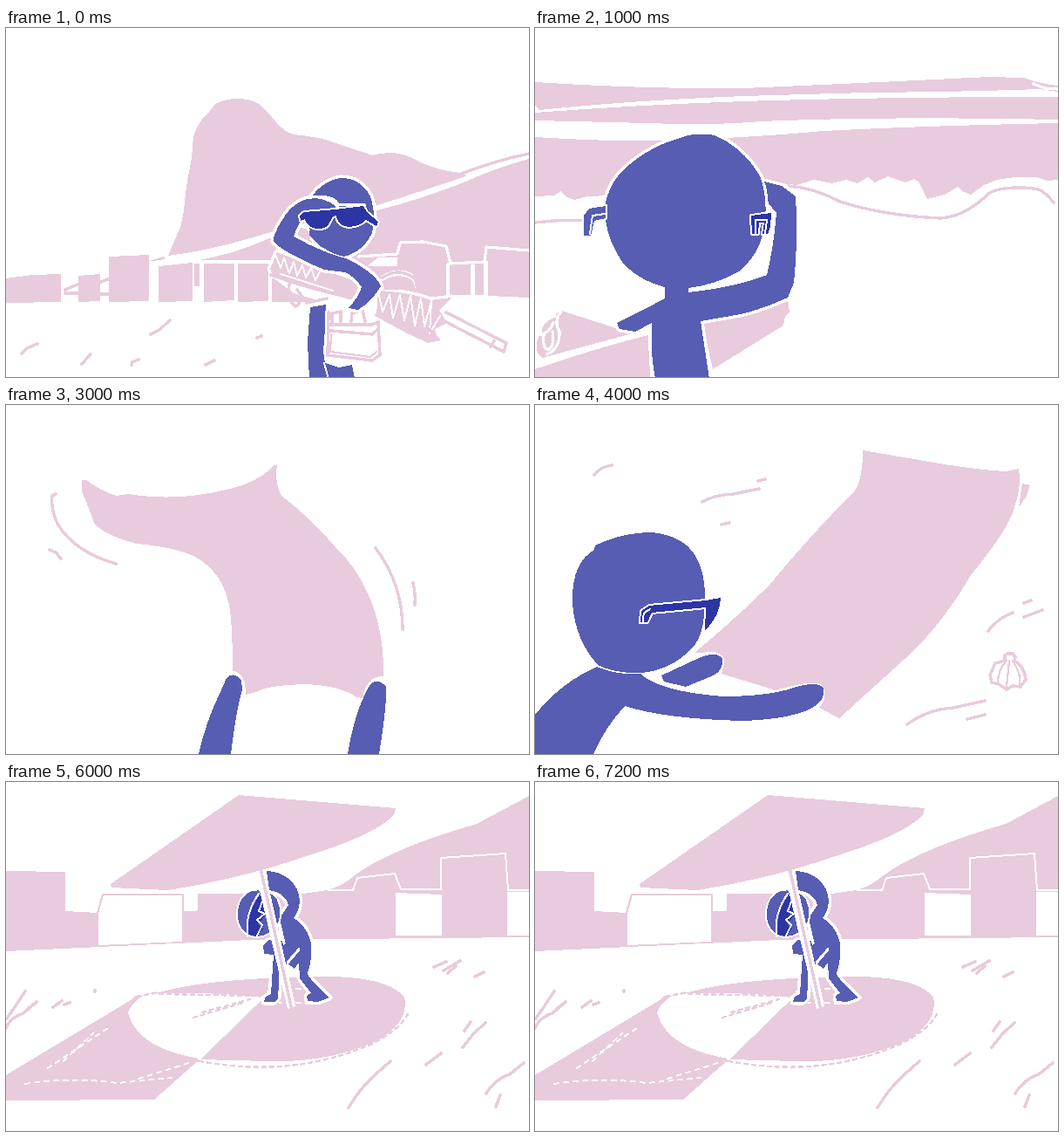
Animation, 600 px wide and 400 px high, one loop 8000 ms. Source, as an HTML page:

```html
<!DOCTYPE html>
<html lang="en">
<head>
<meta charset="utf-8">
<title>Beach day</title>
<style>
html, body { margin: 0; width: 100%; height: 100%; overflow: hidden; background: #fff; }
svg { display: block; width: 100vw; height: 100vh; shape-rendering: crispEdges; }
path { fill: none; stroke-linecap: round; stroke-linejoin: round; }
.pink { fill: #e8cbdc; }
.blue { fill: #565db2; }
.dark { fill: #2c35a4; }
.white { fill: #fff; }
.rim { stroke: #fff; stroke-width: 7; paint-order: stroke; }
.thin { stroke: #fff; stroke-width: 4; paint-order: stroke; }
.line { stroke: #e8cbdc; stroke-width: 3.4; }
.fine { stroke: #e8cbdc; stroke-width: 2.2; }
.cut { stroke: #fff; stroke-width: 3.2; }
.nick { stroke: #fff; stroke-width: 2; }
.ink { stroke: #2c35a4; stroke-width: 4; }
.dots { stroke: #e8cbdc; stroke-width: 2.4; stroke-dasharray: 4 5; }
.wdots { stroke: #fff; stroke-width: 2; stroke-dasharray: 5 6; }
</style>
</head>
<body>
<svg id="stage" viewBox="0 0 600 400"></svg>
<script>
const NS = 'http://www.w3.org/2000/svg';
const LOOP = 8000;

// Each scene: start time and [class, path] layers from back to front.
const scenes = [
  { at: 0, layers: [
    // hills
    ['pink', 'M186 261L200 228Q204 214 205 198L208 175L213 150L215 124Q221 106 231 99L240 87Q252 81 266 81Q280 81 290 87Q300 95 309 107Q319 119 330 122Q360 125 376 131L420 146Q445 139 466 149Q492 164 524 166L528 170Q480 186 426 203L300 235Q240 254 186 261Z'],
    ['line', 'M512 171Q560 152 600 144'],
    ['pink', 'M600 150Q560 161 530 175Q480 195 426 209L302 241Q260 260 216 267V296H222V269H303V314H345L420 310H504L508 306H533V271H538V306H548V268L600 254Z'],
    // town
    ['pink', 'M0 287L30 283L63 282V314L0 315ZM83 284L108 282V313L83 314ZM118 262L164 260V313L118 314ZM175 273L214 269V313L175 314ZM227 270L262 269V312L227 314ZM264 269H302V313L264 314ZM553 254L600 252V309L553 307Z'],
    ['line', 'M68 300L82 294M68 304H82M109 291L117 288M109 305H117M164 269L180 264'],
    ['cut', 'M165 269Q215 263 250 253L304 237M214 268H304M225 270V314M264 270V314M303 268V314M404 262L449 259L452 246L478 245L505 250L510 270L549 268L551 251L600 255M507 270V306M535 271V306M551 268V307'],
    ['white', 'M427 263H449V273H414Z'],
    // rolled umbrella
    ['pink rim', 'M311 257L402 291L407 308L398 312Q350 300 306 283L303 276Z'],
    ['nick', 'M310 262L315 275L319 264L325 281L330 268L334 284L340 272L344 286L350 275L355 289L360 279M315 282L375 301'],
    ['white', 'M306 286L400 314L392 322L330 304Z'],
    ['line', 'M304 283Q350 300 398 309M326 291Q320 310 332 319Q338 318 336 308M334 300L345 315L368 310'],
    ['pink rim', 'M427 301Q465 303 487 312L511 309L497 323L506 338L492 345L496 357L484 361L425 329Z'],
    ['nick', 'M428 307L432 325L440 306L444 332L452 306L457 335L464 307L469 341L476 310L480 342L488 313L486 350L498 330'],
    ['white', 'M430 284Q450 272 467 282L470 299L430 300Z'],
    ['pink', 'M431 291Q450 278 467 290L470 300H431Z'],
    ['line', 'M432 286Q450 274 467 286M425 329L460 348L484 359L496 357L485 345'],
    ['line', 'M503 336L571 371L574 361L505 326M560 359L556 365'],
    // bag and body
    ['blue rim', 'M349 320L367 317L366 345L364 371L366 384L382 389L397 386L400 402H348L346 360Z'],
    ['nick', 'M365 384L370 402'],
    ['white', 'M366 324L429 337L432 375L422 383L367 377Z'],
    ['line', 'M370 326L369 375L420 381L429 375L427 337L420 340H372M372 347L420 351L427 345M374 339V327L384 325V336M396 336L397 327L409 323L412 336'],
    ['fine', 'M373 351L372 371L418 377L425 371'],
    // head and arms
    ['blue rim', 'M351 193Q363 176 383 172Q406 171 418 193Q425 214 420 235Q410 256 388 262Q365 260 351 239Q343 220 351 193Z'],
    ['pink', 'M334 229L345 230L350 241L336 239Z'],
    ['blue rim', 'M378 201Q372 193 345 196Q327 202 317 220Q306 237 307 245Q318 257 365 277L389 280Q400 285 408 297Q404 309 393 321L404 323Q421 312 430 296Q425 284 408 274Q394 264 382 262Q357 254 330 239Q337 219 345 211Q364 211 378 207Z'],
    ['blue', 'M350 218H420V235Q411 253 388 262Q364 257 348 237Z'],
    ['cut', 'M348 193Q366 193 378 202L412 203'],
    ['dark thin', 'M342 211L378 208L410 204L414 211L427 222L425 227L413 220Q407 227 393 228Q380 226 379 215L375 216L369 227Q362 232 352 229Q344 225 343 219L338 221L337 215Z'],
    // sand
    ['line', 'M18 373L24 367L36 362M87 385L97 374M144 386L145 383L152 380M166 351L176 346L188 335M229 386L239 381M288 355L293 353']
  ] },
  { at: 1000, layers: [
    ['pink', 'M0 62Q120 70 240 69Q400 62 520 56L560 57Q580 64 600 66V73L578 70Q500 73 380 74L240 78Q110 83 5 94L0 89ZM0 97Q120 88 240 84Q400 79 600 79V105Q400 101 260 107Q200 112 130 109L0 106Z'],
    ['pink', 'M0 125Q100 131 150 129Q260 125 330 118Q450 112 600 109V174L588 175L575 171L550 171L530 174L515 180L500 191L490 187L485 182L470 191L450 196L440 176L435 173L425 177L405 170L390 177L382 171L370 178L357 174L340 178L320 174L300 180L265 176L85 192L60 193L45 197L36 194L30 187L22 192L0 193Z'],
    ['cut', 'M572 64L585 69L600 70'],
    ['line', 'M0 223Q30 219 58 221M290 181Q320 183 350 199Q400 215 465 218Q494 216 520 190Q530 183 555 183Q575 183 582 187Q589 192 595 200'],
    // towel
    ['pink', 'M30 324L112 350Q60 364 9 378Q0 374 2 360L11 336ZM0 391Q70 367 130 352L132 400H0ZM192 338Q250 329 290 311L292 325L287 330L285 341L204 391Z'],
    ['cut', 'M30 325Q21 336 28 348Q29 367 14 374M23 330Q5 336 6 352Q17 349 21 338M10 352Q8 366 15 369Q23 364 20 348'],
    // figure
    ['white', 'M260 176L290 180L303 194L300 295L260 290Z'],
    ['blue rim', 'M175 123Q192 120 206 123L220 130Q245 146 258 170Q269 197 263 235Q256 262 234 279Q208 294 176 298V303Q230 297 266 283Q274 250 277 212L268 201L263 176L283 181L299 193Q302 240 297 292L290 309Q262 322 236 328L190 336L200 402H138Q132 370 134 338L115 348L97 345L94 338L126 322L149 310V297Q118 289 100 268Q80 238 80 207Q83 180 104 160Q126 141 151 131Z'],
    ['cut', 'M263 180Q269 206 264 229Q261 254 243 273'],
    // glasses
    ['blue thin', 'M81 204L62 207L56 215V238H64L68 221L81 218Z'],
    ['nick', 'M80 213L66 215L63 236'],
    ['dark thin', 'M248 215L271 212L270 228L267 236H261L263 223H257L256 236H249Z'],
    ['nick', 'M253 235V220H266L264 235']
  ] },
  { at: 3000, layers: [
    ['pink', 'M87 86H92Q108 98 126 104L141 102Q200 112 265 94Q293 85 308 69H311Q308 90 316 104Q350 130 378 163Q402 186 414 214Q434 255 433 311Q419 310 412 325L409 336L402 335Q385 322 345 320Q300 321 287 329L275 332Q275 306 260 305Q260 260 257 235Q250 192 217 174Q194 163 150 159Q112 149 101 135Q92 110 87 99Z'],
    ['blue', 'M253 313Q261 305 270 315L271 326Q264 350 258 400H221Q230 361 245 331ZM418 320Q427 312 436 323Q437 345 428 400H392Q400 350 418 320Z'],
    ['line', 'M57 102L53 104Q51 118 59 136Q78 168 126 182M50 166L57 169L63 176M424 164Q455 205 455 257M467 204Q470 215 469 229']
  ] },
  { at: 4000, layers: [
    ['pink', 'M376 52L435 62Q500 74 540 76L555 73Q558 95 550 117Q545 140 500 195Q470 246 435 281Q400 313 349 359L326 347Q338 333 328 320Q318 315 276 327L214 308Q220 290 207 283L183 284Q240 236 270 205Q310 156 367 98Q376 85 376 52ZM559 90L568 92L563 106L555 117Z'],
    // figure
    ['blue', 'M69 161Q100 146 135 146Q165 150 178 165Q196 185 195 225Q195 262 181 278Q156 304 122 307Q92 308 72 298Q45 268 43 225Q42 181 68 166ZM71 300Q95 310 121 308Q142 328 215 334Q270 334 300 323Q326 316 331 325Q334 340 312 350Q288 360 240 362Q150 360 103 345Q80 370 67 400H0V355Q30 318 71 300Z'],
    ['blue thin', 'M145 310L188 290Q209 281 215 291Q216 306 202 311L173 323L148 317Z'],
    // glasses
    ['dark thin', 'M121 249L122 236L131 230L196 224L213 221Q213 240 195 259L196 232L134 238L129 249Z'],
    ['nick', 'M124 249Q122 237 133 234'],
    ['ink', 'M134 235L196 228'],
    // breeze
    ['line', 'M68 80Q75 71 88 69M192 111Q205 103 228 102L257 96M256 87L264 85M214 137L223 135M520 259Q530 245 548 238M561 227L569 224M561 243L582 235M427 366Q450 349 480 347L516 339M496 360L516 355'],
    // shell
    ['line', 'M539 287L542 285H548L551 289L550 293Q562 300 563 315L557 323L548 322L541 326L532 320L524 318L522 310L528 296L539 293Z'],
    ['fine', 'M541 293Q531 304 531 318M544 293L541 323M548 293Q558 308 556 320']
  ] },
  { at: 6000, layers: [
    // town
    ['pink', 'M600 16L540 48Q440 77 400 107Q385 120 368 124L340 128H219V148H203L105 150L68 148V103L0 102V194L280 181L600 178Z'],
    ['white', 'M68 103H110V149L68 147ZM108 130H202V183L106 187V150ZM204 128L220 127V147H204ZM447 127L500 129V176H447ZM575 126H600V176H575Z'],
    ['fine', 'M105 150L111 129H203V183'],
    ['nick', 'M370 124H398L403 110L446 105L453 123H499V87L573 82L576 124H600'],
    // mat and shade
    ['pink', 'M0 336L150 246L180 240Q240 224 370 223Q440 224 457 247Q463 275 425 297Q370 322 300 320L222 318L170 364L0 365Z'],
    ['white', 'M140 264Q148 247 165 242Q235 240 295 247L222 317Q150 305 140 264Z'],
    ['dots', 'M149 246Q130 265 145 287Q165 308 220 320M150 246L175 241M222 320Q330 340 420 300Q455 282 463 262M176 243L290 245M215 270L275 252M225 264L280 249'],
    ['cut', 'M294 247L222 317'],
    ['wdots', 'M22 346Q75 338 128 345L190 339M48 328L120 280M66 320L100 288M300 240L350 236M300 252L350 254M152 340L210 322'],
    // figure
    ['blue rim', 'M299 102Q323 103 334 123Q341 141 330 156Q346 166 350 185Q351 207 346 218Q345 224 371 247L366 249L358 252L346 251L345 245L350 242L337 225L336 207L331 214L323 208L314 211L312 248L308 252H296L298 246L304 243L307 198L296 197L295 187L302 181L317 182L316 166L314 156L324 141Q320 127 302 124Z'],
    ['blue thin', 'M266 150Q267 131 282 125Q302 122 311 135Q318 151 310 166Q297 180 281 176Q265 169 266 150Z'],
    ['dark', 'M291 130Q276 151 278 175L288 177L295 168L289 163L299 151L295 139L300 130Z'],
    ['nick', 'M290 128Q274 150 277 177M299 128Q293 138 290 148L297 151L288 158L294 164L288 176'],
    ['cut', 'M314 163L319 185M323 207L336 192'],
    // parasol
    ['white', 'M285 99L296 96L332 257L323 260Z'],
    ['line', 'M292 99L327 257'],
    ['pink', 'M267 15L447 30L445 38Q422 61 350 83Q275 110 186 124L121 121L120 117Z'],
    // sand
    ['line', 'M0 282Q5 270 20 265L33 254M1 271L12 255L22 240M25 260L35 252M54 258L64 251M67 255L73 253M393 373Q407 350 424 335L441 320M482 324L499 311M524 304L536 289L550 276M551 357Q560 341 578 335L594 322M562 372L567 359M491 212L505 206M502 216L521 205M507 219L516 211M538 223L548 218M102 240V239M526 285L533 275']
  ] }
];

function make(tag, attrs, parent) {
  const el = document.createElementNS(NS, tag);
  for (const key in attrs) el.setAttribute(key, attrs[key]);
  return parent.appendChild(el);
}

const stage = document.getElementById('stage');
for (const scene of scenes) {
  scene.group = make('g', {}, stage);
  for (const [kind, d] of scene.layers) make('path', { class: kind, d }, scene.group);
}

function draw(time) {
  const t = time % LOOP;
  const current = scenes.filter(s => s.at <= t).pop();
  for (const s of scenes) s.group.style.display = s === current ? '' : 'none';
}

const start = performance.now();
function tick() {
  draw(performance.now() - start);
  requestAnimationFrame(tick);
}
tick();
</script>
</body>
</html>
```
